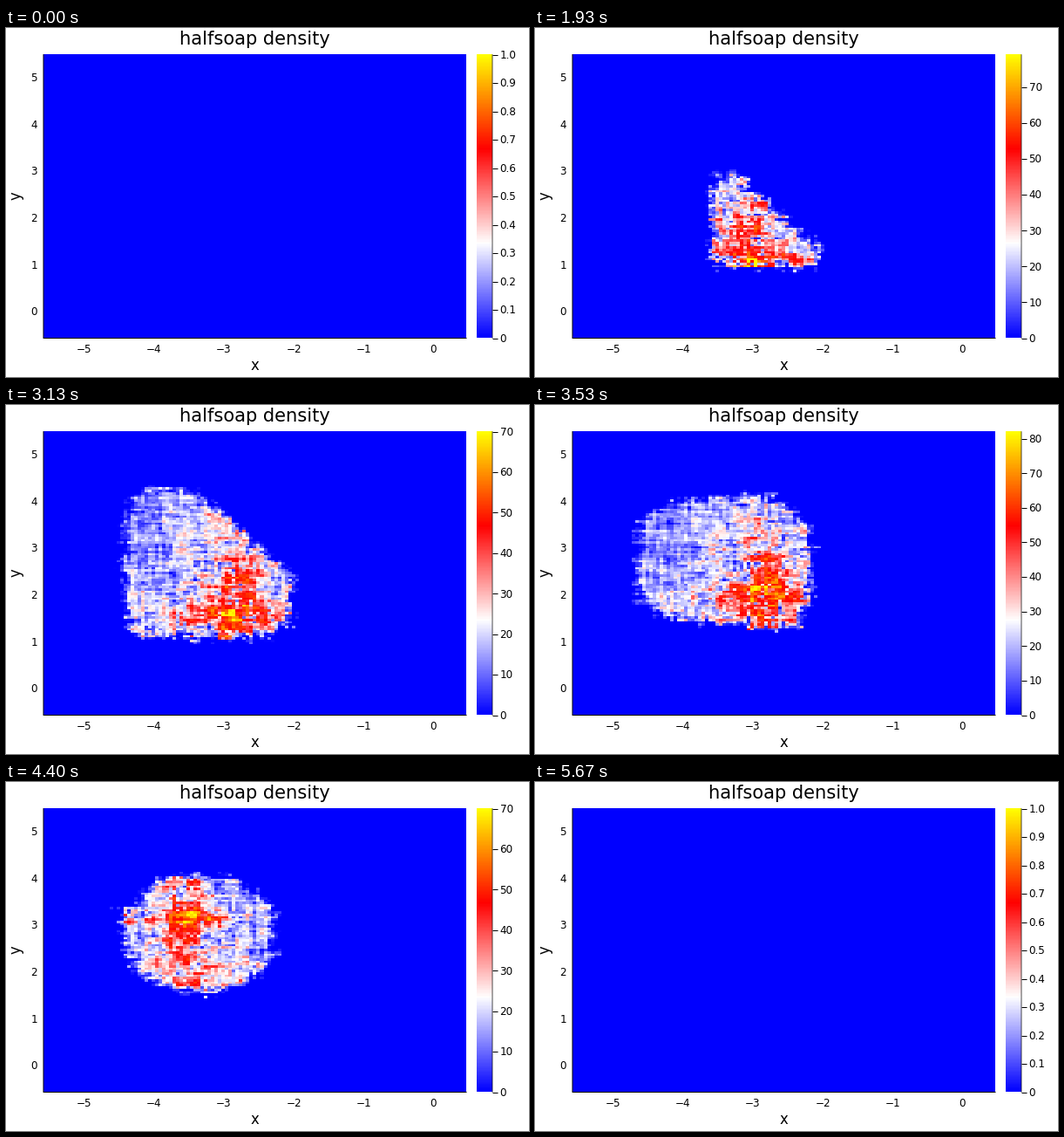
These frames come from a looping animation (600 px wide and 400 px high, 8.07 s). A matplotlib script:

```python
import numpy as np
import matplotlib.pyplot as plt
from matplotlib.animation import FuncAnimation
from matplotlib.colors import LinearSegmentedColormap

plt.rcParams["font.family"] = "DejaVu Sans"

FRAMES, INTERVAL = 269, 30                # one loop of 8070 ms
STEP_MS = 200 / 3                         # the data advance 15 times a second
FIRST, LAST = 16, 79                      # steps with a visible cloud
N = 121                                   # cells per side
L, R, T, B = 43, 528, 30.6, 355.5         # heatmap box in pixels
CB_L, CB_R = 540, 558                     # colour bar
X0, Y0, SPAN = -5.575, -0.575, 6.05
CMAP = LinearSegmentedColormap.from_list("bwry", ["blue", "white", "red", "yellow"], N=768)

cells = (np.arange(N) + 0.5) * SPAN / N
GX, GY = np.meshgrid(X0 + cells, Y0 + cells)

# key points of the motion
KEYS = [FIRST, 29, 39, 47, 58, 66, LAST]
LEFT = [-2.7, -3.58, -4.2, -4.43, -4.82, -4.47, -2.58]
TOP = [1.4, 3.0, 4.2, 4.28, 4.28, 4.12, 2.6]
HOT_X = [-2.4, -3.05, -3.5, -2.8, -2.85, -3.52, -2.4]
HOT_Y = [1.1, 1.05, 1.6, 1.55, 2.4, 3.15, 2.4]
LIMIT = [15, 79, 62, 70, 92, 70, 12]


def smooth(a, ax, width):
    kernel = np.hanning(width + 2)
    return np.apply_along_axis(np.convolve, ax, a, kernel, "same")


def texture(seed):
    """Unit-variance noise: blotches plus streaks along rows and columns."""
    rng = np.random.default_rng(seed)
    layers = [smooth(smooth(rng.normal(size=(N, N)), 0, a), 1, b)
              for a, b in ((4, 4), (1, 9), (9, 1))]
    total = sum(s / s.std() for s in layers)
    return total / total.std()


TEXTURES = [texture(s) for s in range(10)]
PERIOD = 10                               # steps from one texture to the next


def band(d, half):
    return np.exp(-(d / half) ** 4)


def density(k):
    """Cloud as a fraction of the colour limit, and that limit."""
    left, top, hx, hy, limit = (np.interp(k, KEYS, t) for t in (LEFT, TOP, HOT_X, HOT_Y, LIMIT))
    right = -2.02 - 0.25 * np.clip((k - 47) / 11, 0, 1)
    bottom = 0.93 + 0.55 * ((k - FIRST) / 50) ** 3

    i, f = divmod(k, PERIOD)
    f /= PERIOD
    noise = ((1 - f) * TEXTURES[i] + f * TEXTURES[i + 1]) / np.hypot(f, 1 - f)
    grain = np.random.default_rng(500 + k).normal(size=(N, N))

    # rounded box, narrow on the left around step 58, upper right corner cut off
    w, h = (right - left) / 2, (top - bottom) / 2
    u, v = (GX - left) / w - 1, (GY - bottom) / h - 1
    taper = 0.25 * np.exp(-((k - 58) / 6) ** 2)
    p = np.interp(k, [47, 66], [6, 2.2])
    corner = np.interp(k, [29, 39, 47, 58], [0.35, 0.45, 0.85, 2])
    box = 1 - (abs(u) ** p + abs(v / (1 - taper * (1 - u))) ** p) ** (1 / p)
    inside = min(w, h) * np.minimum(box, 0.7 * (corner - u - v))
    mask = np.clip((inside + 0.04 * noise + 0.02 * grain + 0.02) / 0.12, 0, 1)

    dx, dy = GX - hx, GY - hy
    level = 0.2 + 0.14 * np.exp(-(dx / 0.9) ** 2) - 0.05 * v
    level += 0.27 * band(dx, 0.3) * np.exp(-(dy / 1.1) ** 2)
    level += 0.27 * band(dy, 0.2) * np.exp(-(dx / 0.8) ** 2)
    level = level * np.clip(1 + 0.32 * noise + 0.14 * grain, 0.05, 2)
    level = np.where(level > 0.65, 0.65 + 0.45 * (level - 0.65), level)
    return np.clip(level * mask, 0, 1), limit


def state(k):
    if k == 3:                            # lone flash before the flow
        return density(FIRST)
    if k == 84:                           # and one after it
        return density(LAST)[0], 8
    if FIRST <= k <= LAST:
        return density(k)
    return np.zeros((N, N)), 1


def tick_step(limit):
    steps = [m * 10.0 ** e for e in (-1, 0, 1) for m in (1, 2.5, 5)]
    return next(s for s in steps if limit / s < 10.001)


fig = plt.figure(figsize=(6, 4), dpi=100, facecolor="white")
ax = fig.add_axes([0, 0, 1, 1])
ax.axis("off")


def label(x, y, s, px, **kw):
    return ax.text(x, y, s, fontsize=px * 0.72, color="black", **kw)


heat = ax.imshow(np.zeros((N, N)), cmap=CMAP, vmin=0, vmax=1, origin="lower",
                 extent=(L, R, B, T), interpolation="nearest", aspect="auto")
ax.imshow(np.linspace(0, 1, 256)[:, None], cmap=CMAP, origin="lower",
          extent=(CB_L, CB_R, B, T), interpolation="nearest", aspect="auto")
ax.set(xlim=(0, 600), ylim=(400, 0))
ax.plot([L, L, R], [T, B, B], color="black", lw=0.72, snap=False)
ax.plot([CB_R, CB_R], [T, B], color="black", lw=0.5, snap=False)

label(285.7, 19, "halfsoap density", 21, ha="center")
label(285.7, 392, "x", 16.5, ha="center")
label(12, 192.5, "y", 16.5, ha="center", va="center", rotation=90)
for n in range(-5, 1):
    label(L + (n - X0) * (R - L) / SPAN + 0.5, 372, str(n).replace("-", "\u2212"), 12, ha="center")
for n in range(6):
    label(36, B - (n - Y0) * (B - T) / SPAN + 4.8, str(n), 12, ha="right")

ticks = ax.vlines([], 0, 0, color="black", lw=0.72)
names = [label(566.5, 0, "", 12) for _ in range(11)]


def draw(frame):
    v, limit = state(int((frame * INTERVAL + 25) / STEP_MS))
    heat.set_data(v)
    step = tick_step(limit)
    values = step * np.arange(int(limit / step + 1e-6) + 1)
    ys = B - values / limit * (B - T)
    ticks.set_segments([[(CB_R, y), (CB_R + 6, y)] for y in ys])
    digits = 0 if step % 1 == 0 else 1
    for i, name in enumerate(names):
        shown = i < len(values)
        name.set_visible(shown)
        if shown:
            name.set_text(f"{values[i]:.{digits}f}" if i else "0")
            name.set_y(ys[i] + 4.4)
    return [heat, ticks, *names]


anim = FuncAnimation(fig, draw, frames=FRAMES, interval=INTERVAL,
                     repeat=True, repeat_delay=0, blit=False)
plt.show()
```
